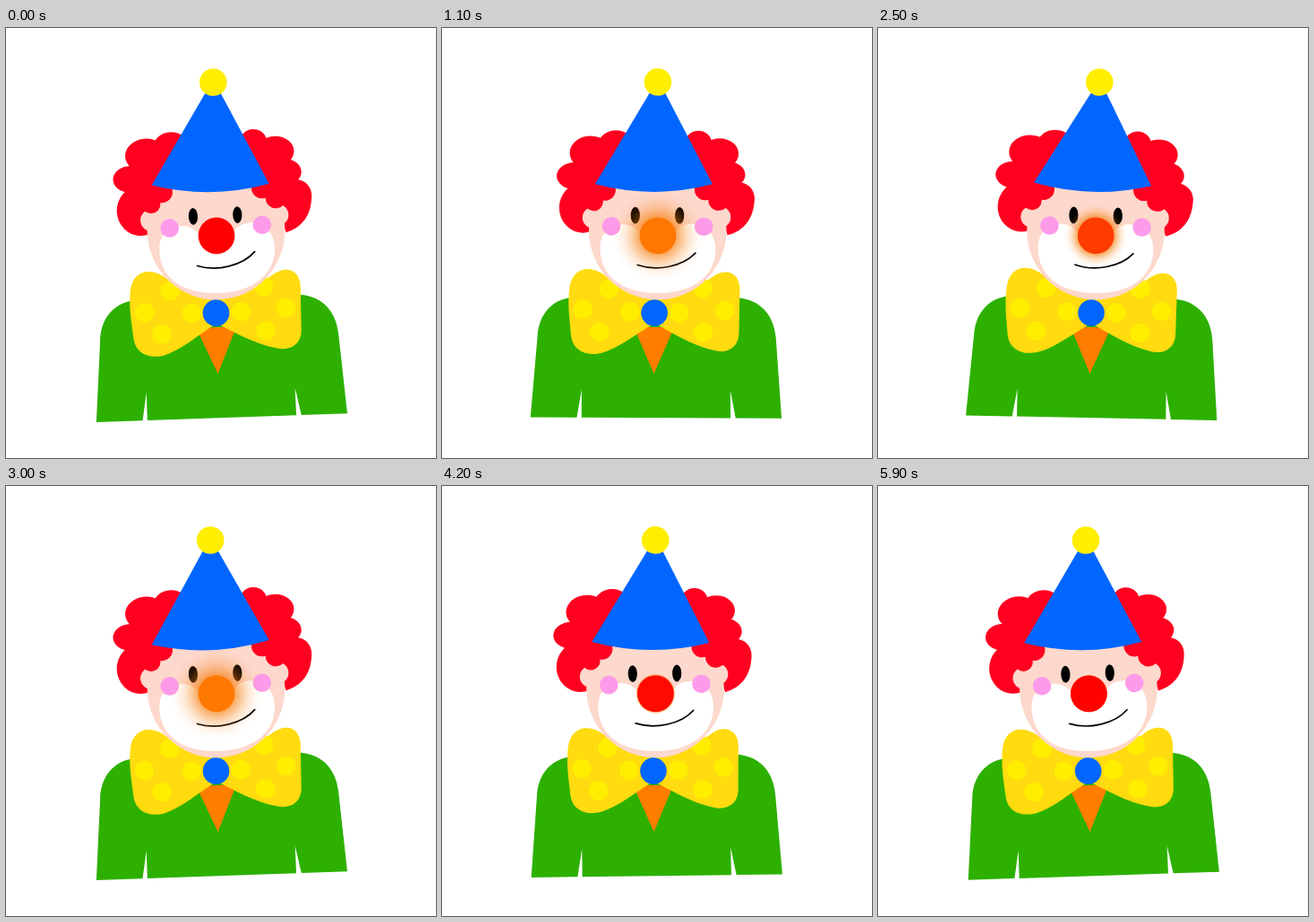
An HTML page with a canvas for the animation above (6000 ms loop, 480 px wide and 480 px high).

```html
<!DOCTYPE html>
<html lang="en">
<head>
<meta charset="utf-8">
<title>Clown</title>
<style>
  html, body { margin: 0; width: 100%; height: 100%; overflow: hidden; background: #fff; }
  canvas { display: block; width: 480px; height: 480px; }
</style>
</head>
<body>
<canvas id="stage" width="480" height="480"></canvas>
<script>
const ctx = document.getElementById('stage').getContext('2d');
const LOOP = 6000, STEP = 100, SWAY = 1500, GLOW = 2000;
const RED = '#ff0020', BLUE = '#0066ff', YELLOW = '#ffee00', SKIN = '#fdd8cc';
const rad = deg => deg * Math.PI / 180;

// 0 -> 1 -> 0 over one period, eased at both ends
function pingPong(t, period) {
  const x = 1 - Math.abs((t % period) / period * 2 - 1);
  return x < 0.5 ? 2 * x * x : 1 - 2 * (1 - x) * (1 - x);
}

function oval(color, x, y, rx, ry = rx) {
  ctx.fillStyle = color;
  ctx.beginPath();
  ctx.ellipse(x, y, rx, ry, 0, 0, 2 * Math.PI);
  ctx.fill();
}

function shape(color, d) {
  ctx.fillStyle = color;
  ctx.fill(new Path2D(d));
}

function rotateAbout(x, y, angle) {
  ctx.translate(x, y);
  ctx.rotate(angle);
  ctx.translate(-x, -y);
}

function drawBody() {
  shape('#2db000', 'M99 435.2 L106.3 346 C107.5 317 126 301.5 148 300.8 L325 300.5 ' +
    'C352 300.5 370 317 372.5 345 L379.3 435.2 H328 L322 404.5 L322.3 435.2 H156 V404 L150.7 435.2 Z');
  shape('#ff7d00', 'M214 334 H259 L236.5 386 Z');
}

function drawBow() {
  const color = '#ffdb10';
  shape(color, 'M238 302 C215 298 194 285 178 274 C160 263.5 144.5 271 142 290 ' +
    'C139.5 308 142 325 144 345 C146.5 361.5 162 367 178 363 C198 357.5 217 341 238 329 Z');
  shape(color, 'M236 302 C258 302 282 292 303 276.5 C318 267 332.5 274 332 292 ' +
    'L331.3 340 C331 356.5 318 363.5 303 359.5 C280 354.5 258 341 236 329 Z');
  for (const [x, y] of [[157, 314.5], [186, 291.5], [175.5, 339.5], [209.5, 317],
                        [264.5, 317.5], [291.5, 339.5], [315, 315], [291, 290.5]]) {
    oval(YELLOW, x, y, 10.7);
  }
}

function drawHair() {
  shape(RED, 'M190 125 L160 145 L148 170 L150 205 L190 200 L205 150 Z');
  oval(RED, 193, 131.5, 20, 17);
  oval(RED, 165, 139.8, 23.5, 19);
  oval(RED, 147, 165.5, 20, 15);
  oval(RED, 156.5, 201, 26.5, 28);
  shape(RED, 'M285 125 L315 145 L325 170 L322 205 L295 200 L275 150 Z');
  oval(RED, 285, 128.5, 15, 14);
  oval(RED, 309, 140, 21, 17);
  oval(RED, 317.5, 163.5, 20, 15);
  shape(RED, 'M312 174 C336 166 348.5 177 348 191 C347 213 336 226 318 231 L308 200 Z');
}

function drawFace() {
  oval(SKIN, 168, 212, 12);
  oval(SKIN, 309.5, 211, 12);
  oval(SKIN, 240, 226, 76.8, 77.3);
  oval(RED, 168.5, 194, 10.5);
  oval(RED, 181, 181, 12);
  oval(RED, 293, 180, 12);
  oval(RED, 308, 192, 11.5);
  shape('#fff', 'M176 246 C176 228 188 219.5 202 219.5 C212 219.5 222 227 226 238 ' +
    'H254 C258 226 267 218.5 278 218.5 C293 218.5 304.8 230 304.8 246 ' +
    'C304.8 279 277 296 240.5 296 C203 296 176 279 176 246 Z');
  oval('#000', 215, 209.3, 5.1, 9.4);
  oval('#000', 264.4, 209.3, 5.1, 9.4);
  oval('#fc9bea', 188.3, 221.5, 10.3);
  oval('#fc9bea', 291.5, 221.5, 10.3);
  ctx.strokeStyle = '#000';
  ctx.lineWidth = 1.7;
  ctx.lineCap = 'round';
  ctx.stroke(new Path2D('M217.6 264.6 C240 272 268.5 266 282.3 251'));
}

function drawNose(level) {
  const x = 240.3, y = 231.8, r = 20.4;
  if (level > 0) {
    const reach = r + 31 * level;
    const glow = ctx.createRadialGradient(x, y, r, x, y, reach);
    for (const [at, alpha] of [[0, 0.66], [0.2, 0.44], [0.4, 0.25], [0.6, 0.12], [0.8, 0.04], [1, 0]]) {
      glow.addColorStop(at, `rgba(245, 125, 10, ${alpha})`);
    }
    oval(glow, x, y, reach);
  }
  oval(`rgb(255, ${Math.round(120 * level)}, 0)`, x, y, r);
}

function drawHat(level) {
  ctx.save();
  rotateAbout(236, 174, rad(1.6 * (1 - level)));
  shape(BLUE, 'M239.5 57 L301 174 Q236 191.5 170 174.7 Z');
  oval(YELLOW, 239.4, 60.3, 15.3);
  ctx.restore();
}

function draw(t) {
  const level = pingPong(t, GLOW);
  ctx.fillStyle = '#fff';
  ctx.fillRect(0, 0, 480, 480);
  ctx.save();
  rotateAbout(240, 384, rad(4 * pingPong(t, SWAY) - 2));
  drawBody();
  drawBow();
  drawHair();
  drawFace();
  drawNose(level);
  drawHat(level);
  oval(BLUE, 236.8, 318, 14.8);
  ctx.restore();
}

const start = performance.now();
function tick() {
  const t = (performance.now() - start) % LOOP;
  draw(Math.floor(t / STEP) * STEP);
  requestAnimationFrame(tick);
}
tick();
</script>
</body>
</html>
```
